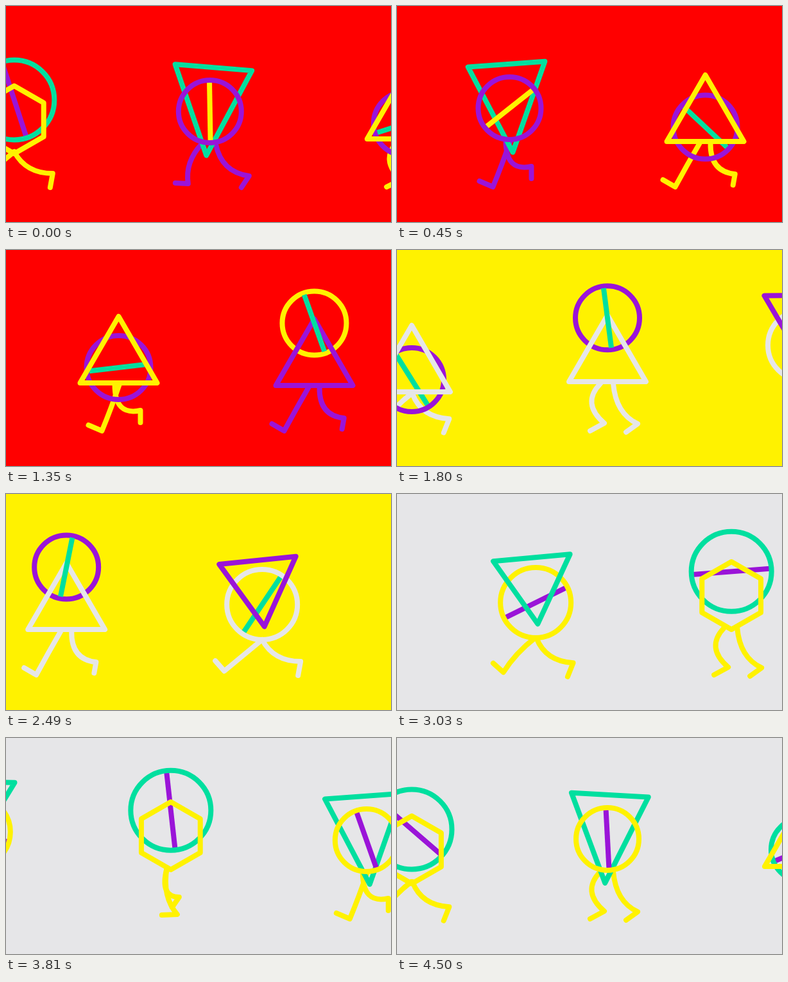
Write an HTML page with a canvas that moves like this. It is 600 by 338 pixels and loops after 4530 ms.

```html
<!DOCTYPE html>
<html>
<head>
<meta charset="utf-8">
<title>Walking shapes</title>
<style>
html, body { margin: 0; height: 100%; overflow: hidden; }
canvas { display: block; width: 600px; height: 338px; }
</style>
</head>
<body>
<canvas id="stage" width="600" height="338"></canvas>
<script>
const ctx = document.getElementById('stage').getContext('2d');
const RED = '#ff0000', YELLOW = '#fff200', GREY = '#e6e6e8', PURPLE = '#9a14d8', TEAL = '#00df9f';
const TAU = Math.PI * 2;
const CYCLE = 19;          // frames in one walk cycle
const SPEED = 305 / 30;    // pixels per frame

// Hip height: [phase, y]
const bounce = [
  [0, 206], [1, 213], [2, 222], [3, 220], [4, 212], [7, 200], [8, 201], [9, 208],
  [10, 217], [11, 222], [12, 225], [13, 221], [15, 208], [18, 199]
];

// One leg: [phase, hip x, bend x, bend y, ankle x, ankle y, toe x, toe y]
const gait = [
  [0, -11, -41, 240, -5, 271, -27, 283],
  [1, -13, -39, 244, -34, 278, -54, 277],
  [1.8, -1, -32, 249, -50, 279, -66, 265],
  [2.66, 0, -30, 253, -59, 277, -73, 261],
  [4, -9, -28, 248, -47, 283, -66, 272],
  [5.26, 1, -12, 249, -26, 283, -47, 274],
  [7, -6, -14, 248, 10, 276, -14, 277],
  [8.26, 6, 2, 246, 27, 275, 6, 281],
  [9.36, 9, 13, 256, 47, 272, 29, 285],
  [10.5, 9, 18, 260, 61, 266, 49, 284],
  [11.1, 0, 15, 262, 58, 264, 50, 286],
  [12, 0, 18, 262, 60, 262, 56, 284],
  [14, 8, 7, 259, 46, 263, 43, 280],
  [15, -6, -6, 260, 34, 251, 34, 270],
  [17.2, -6, -18, 249, 13, 249, 2, 265],
  [18, -12, -31, 251, 7, 253, 2, 273]
];

const mod = (a, b) => ((a % b) + b) % b;

// Periodic cubic interpolation of the columns after the phase
function sample(rows, phase) {
  const p = mod(phase, CYCLE), m = rows.length;
  let i = m - 1;
  while (rows[i][0] > p) i--;
  const row = j => rows[mod(j, m)];
  const time = j => row(j)[0] + CYCLE * Math.floor(j / m);
  const span = time(i + 1) - time(i), u = (p - time(i)) / span;
  return row(i).slice(1).map((a, k) => {
    const value = j => row(j)[k + 1];
    const slope = j => (value(j + 1) - value(j - 1)) / (time(j + 1) - time(j - 1)) * span;
    const b = value(i + 1), sa = slope(i), sb = slope(i + 1);
    return a + u * (sa + u * (3 * (b - a) - 2 * sa - sb + u * (2 * (a - b) + sa + sb)));
  });
}

function ramp(keys, s) {
  let i = 0;
  while (i < keys.length - 2 && s > keys[i + 1][0]) i++;
  const [[t0, a], [t1, b]] = [keys[i], keys[i + 1]];
  return a + (b - a) * (s - t0) / (t1 - t0);
}

function stroke(color, cap = 'round') {
  ctx.strokeStyle = color;
  ctx.lineCap = cap;
  ctx.stroke();
}

function circle(y, r, color) {
  ctx.beginPath();
  ctx.arc(0, y, r, 0, TAU);
  stroke(color);
}

function polygon(points, color) {
  ctx.beginPath();
  points.forEach(p => ctx.lineTo(...p));
  ctx.closePath();
  stroke(color);
}

function bar(y, r, degrees, color) {
  const a = degrees * TAU / 360, dx = r * Math.cos(a), dy = r * Math.sin(a);
  ctx.beginPath();
  ctx.moveTo(-dx, y - dy);
  ctx.lineTo(dx, y + dy);
  stroke(color, 'butt');
}

function tilted(y, s, points, color) {
  ctx.save();
  ctx.translate(0, y);
  ctx.rotate(-6 * Math.sin(TAU * (s - 7.8) / CYCLE) * TAU / 360);
  polygon(points, color);
  ctx.restore();
}

function leg(phase, y, color) {
  const [hip, bx, by, ax, ay, tx, ty] = sample(gait, phase);
  ctx.beginPath();
  ctx.moveTo(hip, y + 3);
  ctx.quadraticCurveTo(bx, by, ax, ay);
  ctx.lineTo(tx, ty);
  stroke(color);
}

const tent = y => [[0, y - 104], [60, y], [-60, y]];
const hexagon = y => [0, 1, 2, 3, 4, 5].map(i =>
  [53 * Math.sin(i * TAU / 6), y - 53 * Math.cos(i * TAU / 6)]);

// y: hip height, lift: extra rise of the loose part; colours are [body, extra, bar]
const walkers = [
  {
    slot: 1, onRed: [YELLOW, TEAL, PURPLE],
    spin: [[-19, -4.4], [7, 83.7], [30, 221], [31, 252]],
    draw(y, lift, s, angle, [body, extra, stick]) {
      bar(y - 78 + lift, 60, angle, stick);
      circle(y - 78 + lift, 62.5, extra);
      polygon(hexagon(y - 47), body);
    }
  },
  {
    slot: 0, onRed: [PURPLE, TEAL, YELLOW],
    spin: [[-23, 70.6], [0, 87], [1, 89], [29, 194]],
    draw(y, lift, s, angle, [body, extra, stick]) {
      tilted(y - 48, s, [[-60, -69], [60, -69], [0, 69]], extra);
      bar(y - 48, 46, angle, stick);
      circle(y - 48, 49, body);
    }
  },
  {
    slot: -1, onRed: [YELLOW, PURPLE, TEAL],
    spin: [[-30, -22], [-1, 104.3], [30, 238]],
    draw(y, lift, s, angle, [body, extra, stick]) {
      bar(y - 18 + lift, 47, angle, stick);
      circle(y - 18 + lift, 50, extra);
      polygon(tent(y), body);
    }
  },
  {
    slot: -2, onRed: [PURPLE, YELLOW, TEAL],
    spin: [[0, 82.6], [23, 101.3]],
    draw(y, lift, s, angle, [body, extra, stick]) {
      circle(y - 93 + lift, 50, extra);
      polygon(tent(y), body);
      bar(y - 93 + lift, 47, angle, stick);
    }
  },
  {
    slot: -3, onRed: [PURPLE, TEAL, YELLOW],
    spin: [[-7, 123.7], [11, 153.7]],
    draw(y, lift, s, angle, [body, extra, stick]) {
      bar(y - 52, 52, angle, stick);
      circle(y - 52, 55, body);
      tilted(y - 52 + lift, s, [[-60, -69.5], [60, -69.5], [0, 34.5]], extra);
    }
  }
];

const scenes = [
  { back: RED },
  { back: YELLOW, colors: [GREY, PURPLE, TEAL] },
  { back: GREY, colors: [YELLOW, TEAL, PURPLE] }
];

function render(now) {
  const frame = Math.max(0, Math.floor((now % 4530) / 30) - 1);
  const scene = scenes[Math.floor(frame / 50)];
  ctx.fillStyle = scene.back;
  ctx.fillRect(0, 0, 600, 338);
  ctx.lineWidth = 8;
  ctx.lineJoin = 'round';
  for (const w of walkers) {
    const s = mod(frame + 76 + 30 * w.slot, 150) - 75;
    if (Math.abs(s) > 42) continue;
    const colors = scene.colors || w.onRed;
    const [y] = sample(bounce, s);
    ctx.save();
    ctx.translate(328 - SPEED * s, 0);
    leg(s, y, colors[0]);
    leg(s + 9.7 + 0.5 * Math.cos(TAU * (s - 7) / CYCLE), y, colors[0]);
    w.draw(y, (y - 225) * 0.35, s, ramp(w.spin, s), colors);
    ctx.restore();
  }
  requestAnimationFrame(() => render(performance.now() - start));
}

const start = performance.now();
render(0);
</script>
</body>
</html>
```
